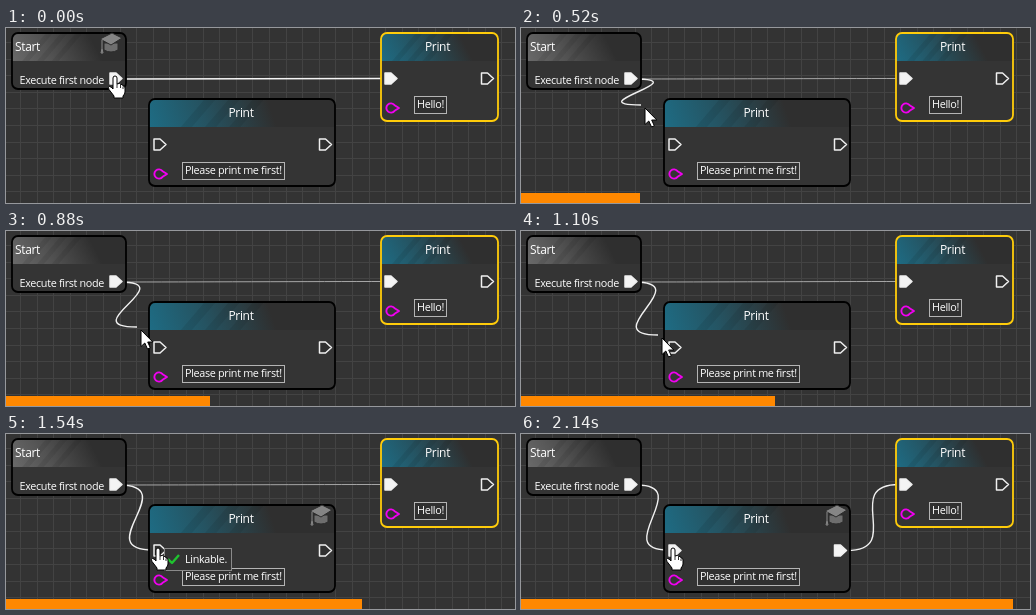
These frames come from a looping animation (509x175 px, 2200 ms). An HTML page with a canvas:

```html
<!DOCTYPE html>
<html lang="en">
<head>
<meta charset="utf-8">
<title>Relinking nodes</title>
<style>
html, body { margin: 0; width: 100%; height: 100%; overflow: hidden; background: #333; }
canvas { display: block; }
</style>
</head>
<body>
<canvas id="stage" width="509" height="175"></canvas>
<script>
const ctx = document.getElementById('stage').getContext('2d');
const FONT = '"Open Sans", "Noto Sans", sans-serif';
const LOOP = 2200;

// Duration of every step, in hundredths of a second
const steps = [6, 8, 8, 6, 8, 8, 8, 6, 8, 8, 6, 8, 8, 8, 6, 8, 8, 6, 8, 6, 8, 8, 8, 11, 3, 8, 8, 8, 6, 6];

// Pointer path: step, x, y
const path = [[0, 109, 48], [1, 109, 48], [4, 117, 65], [10, 131, 94], [15, 141, 107],
  [18, 150, 112], [20, 152, 114], [30, 152, 114]];

const pins = { start: [113, 51], startTip: [116, 51], lowIn: [147, 116], lowOut: [326, 116.5], highIn: [378, 50.5] };

function stepAt(ms) {
  let k = 0;
  for (let end = steps[0] * 10; ms >= end && k < steps.length - 1; end += steps[k] * 10) k++;
  return k;
}

function pointerAt(k) {
  const i = path.findIndex(p => p[0] > k);
  const [k0, x0, y0] = path[i - 1], [k1, x1, y1] = path[i];
  const u = (k - k0) / (k1 - k0);
  return [x0 + (x1 - x0) * u, y0 + (y1 - y0) * u].map(Math.round);
}

function shape(d, x, y, fill, stroke, width = 1) {
  const p = new Path2D(d);
  ctx.save();
  ctx.translate(x, y);
  ctx.lineJoin = 'round';
  ctx.lineWidth = width;
  if (fill) { ctx.fillStyle = fill; ctx.fill(p); }
  if (stroke) { ctx.strokeStyle = stroke; ctx.stroke(p); }
  ctx.restore();
}

function text(s, x, y, size = 10.8, align = 'left') {
  ctx.font = `500 ${size}px ${FONT}`;
  ctx.letterSpacing = '-0.32px';
  ctx.textAlign = align;
  ctx.fillStyle = '#fff';
  ctx.fillText(s, x, y);
}

function frame(x, y, w, h, fill, stroke) {
  ctx.fillStyle = fill;
  ctx.fillRect(x, y, w, h);
  ctx.strokeStyle = stroke;
  ctx.lineWidth = 1;
  ctx.strokeRect(x + .5, y + .5, w - 1, h - 1);
}

function field(s, x, y, w) {
  frame(x, y, w, 18, '#303030', '#b4b4b4');
  text(s, x + 3, y + 12);
}

function grid() {
  ctx.fillStyle = '#333';
  ctx.fillRect(0, 0, 509, 175);
  ctx.fillStyle = '#434343';
  for (let i = 0; i < 31; i++) {
    const at = Math.round(14 + i * 16.6);
    ctx.fillRect(at, 0, 1, 175);
    ctx.fillRect(0, at, 509, 1);
  }
}

function wire([x0, y0], [x1, y1], pull, color, width) {
  ctx.beginPath();
  ctx.moveTo(x0, y0);
  ctx.bezierCurveTo(x0 + pull, y0, x1 - pull, y1, x1, y1);
  ctx.strokeStyle = color;
  ctx.lineWidth = width;
  ctx.stroke();
}

function node(x, y, w, h, border, tint) {
  ctx.save();
  ctx.beginPath();
  ctx.roundRect(x, y, w, h, 6);
  ctx.fillStyle = '#343434';
  ctx.fill();
  ctx.clip();
  ctx.fillStyle = '#2f2f2f';
  ctx.fillRect(x, y, w, 28);
  // The tint is strongest at the lower left and fades to the upper right
  const glow = ctx.createLinearGradient(x, y + 28, x + w * .62, y - 10);
  glow.addColorStop(0, `rgba(${tint},1)`);
  glow.addColorStop(.45, `rgba(${tint},.6)`);
  glow.addColorStop(1, `rgba(${tint},0)`);
  ctx.fillStyle = glow;
  ctx.fillRect(x, y, w, 28);
  for (let i = 0; i < 3; i++) {
    const s = w * (.3 + i * .13);
    shape(`M${s} 0h${w * .06}l-24 28h${-w * .06}Z`, x, y, 'rgba(0,0,0,.08)');
  }
  ctx.restore();
  ctx.beginPath();
  ctx.roundRect(x, y, w, h, 6);
  ctx.strokeStyle = border;
  ctx.lineWidth = 1.8;
  ctx.stroke();
}

function execPin(x, y, linked) {
  shape('M0 -5.5H6L12 0L6 5.5H0Z', x, y, linked ? '#f4f4f4' : '#303030', '#f0f0f0', 1.5);
}

function dataPin(x, y) {
  shape('M3.6 -2.8A4.6 4.6 0 1 0 3.6 2.8L8 0Z', x, y, null, '#f000f0', 1.9);
}

function cap(x, y) {
  shape('M-7 0V7Q0 11 7 7V0Z', x, y, '#6e6e6e', '#2c2c2c');
  shape('M-11 -4L1 -10L11 -5L0 2Z', x, y, '#858585', '#2c2c2c');
  shape('M-9 -3V6l-1 4h2L-9 6', x, y, null, '#8c8c8c');
}

function hand(x, y) {
  shape('M-2 2Q-2 0 0 0Q2 0 2 2V8Q5 6.5 5.5 8.5Q8 7.5 8 10Q10 9.5 10 12V16Q10 18 8 20V22H-1V20L-6 13.5Q-7.5 11 -5.5 10.5Q-4 10.5 -2 13Z',
    x, y, '#fff', '#000');
  shape('M2 8V12M5.5 9V12M8 10.5V13', x, y, null, '#000', .8);
}

function arrow(x, y) {
  shape('M0 0V16.5L3.8 13L6.5 19L9.3 17.8L6.7 12H11.8Z', x, y, '#fff', '#000');
}

function draw(k) {
  const [px, py] = pointerAt(k);
  const linked = k >= 24, dragging = k >= 2 && !linked, snapped = k >= 18;
  grid();

  if (linked) {
    wire(pins.startTip, pins.lowIn, 58, '#f0f0f0', 1.4);
    wire(pins.lowOut, pins.highIn, 58, '#f0f0f0', 1.4);
  } else {
    wire(pins.start, pins.highIn, 64, dragging ? '#a6a6a6' : '#f4f4f4', dragging ? 1 : 1.4);
    if (dragging) wire(pins.start, snapped ? pins.lowIn : [px - 4, py - 3], 64, '#f0f0f0', 1.4);
  }

  node(6, 5, 114, 56, '#000', '106,106,106');
  text('Start', 9, 23, 12);
  text('Execute first node', 13.5, 56);
  execPin(104, 50.5, true);
  if (k < 5) cap(105, 15);

  node(143, 71, 186, 87, '#000', '30,108,132');
  text('Print', 235, 89, 12, 'center');
  execPin(148, 116.5, linked);
  execPin(313.5, 116.5, linked);
  dataPin(153, 146);
  field('Please print me first!', 176, 134, 103);
  if (k >= 17) cap(315, 81);

  node(375, 5, 117, 88, '#ffcc0a', '30,108,132');
  text('Print', 431.5, 23, 12, 'center');
  execPin(379, 50.5, true);
  execPin(475.5, 50.5, false);
  dataPin(385, 80);
  field('Hello!', 408, 68, 33);

  if (k >= 19 && !linked) {
    frame(158, 114, 68, 23, '#333', '#8a8a8a');
    shape('M0 4L4 8L11 0', 162, 121, null, '#1fc32f', 2.4);
    text('Linkable.', 179, 129);
  }

  (k < 6 || snapped ? hand : arrow)(px, py);

  ctx.fillStyle = '#ff8800';
  ctx.fillRect(0, 165, Math.round(k * 16.96), 10);
}

const begin = performance.now();
function tick() {
  draw(stepAt((performance.now() - begin) % LOOP));
  requestAnimationFrame(tick);
}
tick();
</script>
</body>
</html>
```
